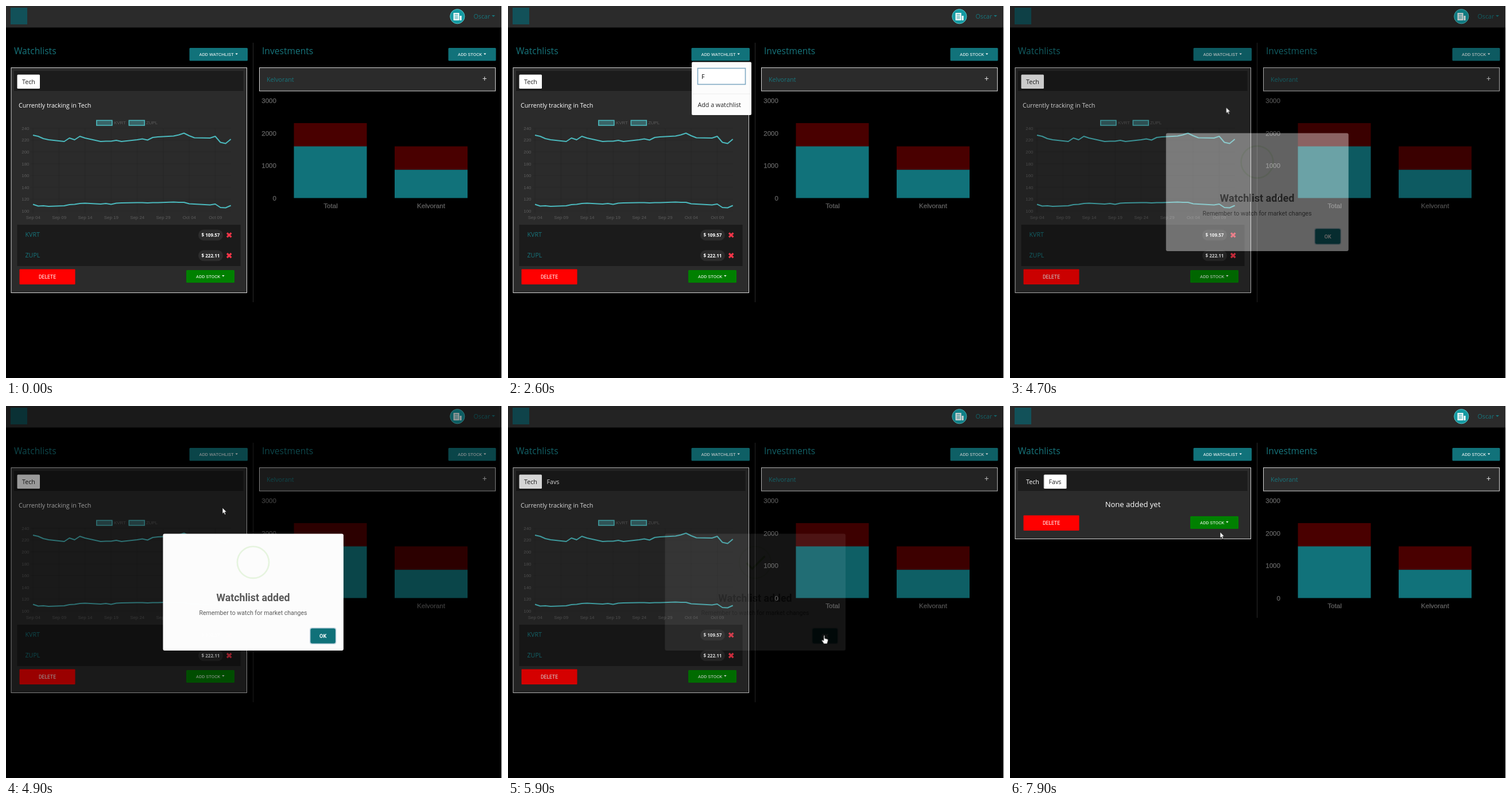
These frames come from a looping animation (864 px wide and 648 px high, 8 s). An HTML page:

```html
<!DOCTYPE html>
<html lang="en">
<head>
<meta charset="utf-8">
<title>Stock watchlists</title>
<style>
html, body { margin: 0; width: 100%; height: 100%; overflow: hidden; background: #000; }
svg { display: block; width: 864px; height: 648px; }
text { font: 10.7px "Open Sans", sans-serif; fill: #fff; white-space: pre; }
.mid { text-anchor: middle; }
.end { text-anchor: end; }
.teal { fill: #17757c; }
.head { font-size: 15.6px; }
.btn { font: 7.9px Roboto, sans-serif; }
.price { font-size: 8px; font-weight: 700; }
.axis { font: 7.9px "Liberation Sans", Arial, sans-serif; fill: #5c5c5c; }
.bar { font: 11.6px "Liberation Sans", Arial, sans-serif; fill: #666; stroke: #666; stroke-width: .25; }
.card { fill: #2b2b2b; stroke: #d6d6d6; }
.line { fill: none; stroke: #4bb9bd; stroke-width: 2; stroke-linejoin: round; }
.key { fill: #3a6467; stroke: #4bb9bd; stroke-width: 1.6; }
.cross { stroke: #f23548; stroke-width: 3.2; }

/* hard switches */
.sw { animation: 8s step-end infinite; }
.off { visibility: hidden; }
.menu { animation-name: menu; }
.hint { animation-name: hint; }
.focus { animation-name: focus; }
.k1 { animation-name: k1; }
.k2 { animation-name: k2; }
.k3 { animation-name: k3; }
.k4 { animation-name: k4; }
.first { animation-name: first; }
.second { animation-name: second; }
.foot { animation-name: foot; }
.tab { animation-name: tab; }
.techTab { animation-name: techTab; }
.favTab { animation-name: favTab; }
.arrow { animation-name: arrow; }
.hand { animation-name: hand; }
.beam { animation-name: beam; }
@keyframes menu { 12.5% { visibility: visible } 56.875% { visibility: hidden } }
@keyframes hint { 12.5% { visibility: visible } 30% { visibility: hidden } }
@keyframes focus { 25% { visibility: visible } 56.875% { visibility: hidden } }
@keyframes k1 { 30% { visibility: visible } 56.875% { visibility: hidden } }
@keyframes k2 { 33.125% { visibility: visible } 56.875% { visibility: hidden } }
@keyframes k3 { 35.625% { visibility: visible } 56.875% { visibility: hidden } }
@keyframes k4 { 38.125% { visibility: visible } 56.875% { visibility: hidden } }
@keyframes first { 91.25%, 100% { visibility: hidden } }
@keyframes second { 91.25%, 100% { visibility: visible } }
@keyframes foot { 91.25%, 100% { transform: translateY(-268px) } }
@keyframes tab { 91.25%, 100% { transform: translateX(39.5px) } }
@keyframes techTab { 0% { fill: #222 } 91.25%, 100% { fill: #fff } }
@keyframes favTab { 73.75% { visibility: visible; fill: #fff } 91.25%, 100% { visibility: visible; fill: #222 } }
@keyframes arrow {
  51% { visibility: visible } 66.9% { visibility: hidden }
  74% { visibility: visible } 82.5% { visibility: hidden }
  85.6% { visibility: visible } 88% { visibility: hidden }
  95.6%, 100% { visibility: visible }
}
@keyframes hand {
  66.9% { visibility: visible } 74% { visibility: hidden }
  88% { visibility: visible } 95.6% { visibility: hidden }
}
@keyframes beam { 82.5% { visibility: visible } 85.6% { visibility: hidden } }

/* dialog */
.veil { opacity: 0; animation: veil 8s ease infinite; }
.modal { opacity: 0; transform-origin: 430.5px 324.3px; animation: modal 8s ease infinite, pop 8s ease infinite; }
.tick { stroke-dasharray: 47; stroke-dashoffset: 47; animation: tick 8s linear infinite; }
@keyframes veil { 0%, 57.625% { opacity: 0 } 61.375%, 72.5% { opacity: 1 } 76.25%, 100% { opacity: 0 } }
@keyframes modal { 0%, 57.625% { opacity: 0 } 60.125%, 72.5% { opacity: 1 } 75%, 100% { opacity: 0 } }
@keyframes pop {
  0%, 57.625% { transform: scale(.5) } 59.3125% { transform: scale(1.05) }
  60.625% { transform: scale(.95) } 61.375%, 100% { transform: none }
}
@keyframes tick { 0%, 62.5% { stroke-dashoffset: 47 } 66.5%, 100% { stroke-dashoffset: 0 } }

.pointer { animation: pointer 8s ease-in-out infinite; }
@keyframes pointer {
  0%, 51% { transform: translate(372px, 150px) }
  55.6%, 61% { transform: translate(376.5px, 176.5px) }
  68.1%, 73% { transform: translate(555px, 402px) }
  83.75% { transform: translate(125px, 172px) }
  89.4%, 94.4% { transform: translate(79px, 135px) }
  98.7%, 100% { transform: translate(366px, 219.5px) }
}
</style>
</head>
<body>
<svg viewBox="0 0 864 648">
  <rect width="864" height="648"/>
  <rect width="863" height="37.5" fill="#2b2b2b"/>
  <rect x="8" y="3" width="29" height="29" fill="#125159"/>
  <circle cx="786.3" cy="18.2" r="12.6" fill="#149aa2" stroke="#5cc0c4"/>
  <path d="M779.5 12h10v13h-10zM790.5 17h3v8h-3z" fill="#fff"/>
  <path d="M781.5 14.5h6M781.5 17h6M781.5 19.5h6M781.5 22h6" stroke="#149aa2"/>
  <text class="teal" x="814.5" y="22">Oscar</text>
  <path class="teal" d="M846 16h6l-3 3z"/>

  <text class="head teal" x="14" y="84">Watchlists</text>
  <text class="head teal" x="446" y="84">Investments</text>
  <g fill="#11727a">
    <rect x="319.5" y="73" width="101.5" height="22.5" rx="1.5"/>
    <rect x="770.5" y="73" width="83" height="22.5" rx="1.5"/>
  </g>
  <text class="btn" x="336.5" y="87">ADD WATCHLIST</text>
  <text class="btn" x="787" y="87">ADD STOCK</text>
  <path d="M399.5 82.5h4.4l-2.2 2.4zM832 82.5h4.4l-2.2 2.4z" fill="#fff"/>

  <!-- investments -->
  <rect class="card" x="441.5" y="107.5" width="411" height="40.5"/>
  <text class="teal" x="454" y="132">Kelvorant</text>
  <path d="M830.5 126.5h6.5M833.7 123v7" stroke="#ddd"/>
  <path d="M501.5 204h127v41h-127zM677 244.5h127v41h-127z" fill="#490000"/>
  <path d="M501.5 244.5h127v90h-127zM677 285.2h127v49.3h-127z" fill="#11727a"/>
  <g id="scale"></g>
  <text class="bar mid" x="565.5" y="351.5">Total</text>
  <text class="bar mid" x="740.5" y="351.5">Kelvorant</text>

  <!-- watchlists -->
  <g class="sw first">
    <path d="M430.5 64v452" stroke="#2b2b2b"/>
    <rect class="card" x="9" y="107.5" width="410.5" height="392"/>
    <text x="22" y="176.5">Currently tracking in Tech</text>
    <rect class="key" x="157.8" y="199.3" width="27" height="8.6"/>
    <rect class="key" x="214.3" y="199.3" width="27" height="8.6"/>
    <text class="axis" x="188" y="206">KVRT</text>
    <text class="axis" x="244" y="206">ZUPL</text>
    <g id="chart"></g>
    <rect x="19.5" y="381" width="389" height="72" fill="#1b1b1b"/>
    <g id="stocks"></g>
  </g>
  <g class="sw second off">
    <path d="M430.5 64v305" stroke="#2b2b2b"/>
    <rect class="card" x="9" y="107.5" width="410.5" height="124"/>
    <text class="mid" x="214" y="176" style="font-size:13px">None added yet</text>
  </g>
  <rect x="14" y="113" width="399.5" height="35" fill="#1c1c1c"/>
  <rect class="sw tab" x="19.5" y="119.5" width="39.5" height="24.5" rx="1.5" fill="#fff"/>
  <text class="sw techTab" x="28" y="136">Tech</text>
  <text class="sw favTab off" x="67.5" y="136">Favs</text>
  <g class="sw foot">
    <rect x="23.5" y="458.5" width="97" height="26.5" rx="1" fill="#f00"/>
    <text class="btn mid" x="72" y="474.7" style="font-size:8.6px">DELETE</text>
    <rect x="314" y="460" width="84" height="22" rx="1.5" fill="#008000"/>
    <text class="btn" x="331" y="473.5">ADD STOCK</text>
    <path d="M376.2 469h4.4l-2.2 2.4z" fill="#fff"/>
  </g>

  <!-- dropdown -->
  <g class="sw menu off">
    <rect x="320" y="97.5" width="104" height="92.5" rx="2" fill="#fcfcfc"/>
    <rect x="330.5" y="108.5" width="83" height="28" fill="#fff" stroke="#a8a8a8"/>
    <path d="M322 153h100" stroke="#ececec"/>
    <text x="330.5" y="176" style="fill:#222">Add a watchlist</text>
  </g>
  <rect class="sw focus off" x="330.5" y="108.5" width="83" height="28" fill="#fff" stroke="#7fa9c2" stroke-width="1.6"/>
  <text class="sw hint off" x="337" y="127" style="fill:#6c6c6c;font-size:10.2px">Name</text>
  <text x="337" y="127" style="fill:#111"><tspan class="sw k1 off">F</tspan><tspan class="sw k2 off">a</tspan><tspan class="sw k3 off">v</tspan><tspan class="sw k4 off">s</tspan></text>

  <!-- dialog -->
  <g class="veil">
    <rect width="864" height="648" fill="#000" fill-opacity=".4"/>
    <g class="modal">
      <rect x="273.3" y="222.5" width="314.7" height="203.5" rx="3" fill="#fdfdfd"/>
      <circle cx="430.5" cy="272.3" r="27.6" fill="none" stroke="#a5dc86" stroke-opacity=".25" stroke-width="2.6"/>
      <path class="tick" d="M415.5 273.5l10 10L447.5 261.5" fill="none" stroke="#a5dc86" stroke-width="3.3"/>
      <text class="mid" x="430.5" y="340.5" style="font:700 17.8px Roboto,sans-serif;fill:#595959">Watchlist added</text>
      <text class="mid" x="430.5" y="364.3" style="font:10.56px Roboto,sans-serif;fill:#5c5c5c">Remember to watch for market changes</text>
      <rect x="529" y="386" width="46.5" height="29" rx="4" fill="#bcd2de"/>
      <rect x="530.5" y="387.5" width="43.5" height="26" rx="3" fill="#11727a"/>
      <text class="mid" x="552.3" y="403.7" style="font:700 9.2px Roboto,sans-serif">OK</text>
    </g>
  </g>

  <g class="pointer">
    <path class="sw arrow off" d="M0 0v10.6l2.4-2.2 1.7 3.9 1.8-.8-1.7-3.8h3.3z" fill="#fff" stroke="#111" stroke-width=".7"/>
    <path class="sw hand off" d="M-1 0Q0-1 1 0V5l5 1.3q1 .4.8 2L6 11.500 5 14.500H-.5L-4 9.500q-1-2 .8-1.800L-1 9z" fill="#fff" stroke="#111" stroke-width=".8"/>
    <path class="sw beam off" d="M-2.300-5.500h1.800l.5.5.5-.5h1.800M0-5V5M-2.300 5.500h1.800l.5-.5.5.5h1.800" fill="none" stroke="#eee"/>
  </g>
  <rect x="863" width="1" height="648" fill="#fff"/>
</svg>
<script>
const get = id => document.getElementById(id);
const label = (cls, x, y, s) => `<text class="${cls}" x="${x}" y="${y}">${s}</text>`;
const range = (n, f) => Array.from({ length: n }, (_, i) => f(i)).join('');

get('scale').innerHTML = range(4, i => label('bar end', 471, 169.3 + i * 56.4, 3000 - i * 1000));

// trading days only: every weekend skips two days
const dayX = i => 47 + 9.07 * (i + 2 * Math.floor((i + 1) / 5));
const plot = ys => `<polyline class="line" points="${ys.map((y, i) => dayX(i) + ',' + y).join(' ')}"/>`;
const dates = ['Sep 04', 'Sep 09', 'Sep 14', 'Sep 19', 'Sep 24', 'Sep 29', 'Oct 04', 'Oct 09'];
const upper = [225, 227, 231, 233, 236, 230, 233, 227, 230, 236, 235.5, 235.5, 234, 236, 233,
  231.5, 233.5, 229, 228, 226.5, 224.5, 221.5, 226, 229.5, 230, 227, 237.5, 239.5, 232];
const lower = [345.5, 348.5, 348, 349, 348, 346, 345.5, 344, 343.5, 345, 344, 345.5, 343.5, 343, 342.5,
  342.5, 343, 342.5, 342.5, 341.5, 342, 342, 344.5, 345, 346.5, 345, 351, 351.5, 347.5];

get('chart').innerHTML =
  range(8, i => {
    const x = 47 + i * 45.35, y = 213 + i * 20.57;
    return `<path d="M${x} 213v148M43 ${y}H392" stroke="#000" stroke-opacity=".14" stroke-width=".7"/>` +
      label('axis mid', x + .3, 371, dates[i]) + label('axis end', 40.5, y + 2.8, 240 - i * 20);
  }) + plot(upper) + plot(lower);

get('stocks').innerHTML = [['KVRT', '109.57', 399], ['ZUPL', '222.11', 434.7]].map(([name, price, y]) =>
  label('teal', 33.5, y + 3, name) +
  `<rect x="335" y="${y - 9.5}" width="43" height="19" rx="9.500" fill="#2c2c2c"/>` +
  label('price mid', 356.5, y + 3, '$ ' + price) +
  `<path class="cross" d="M385 ${y - 3.7}l7.400 7.400m0-7.400l-7.400 7.400"/>`).join('');
</script>
</body>
</html>
```
